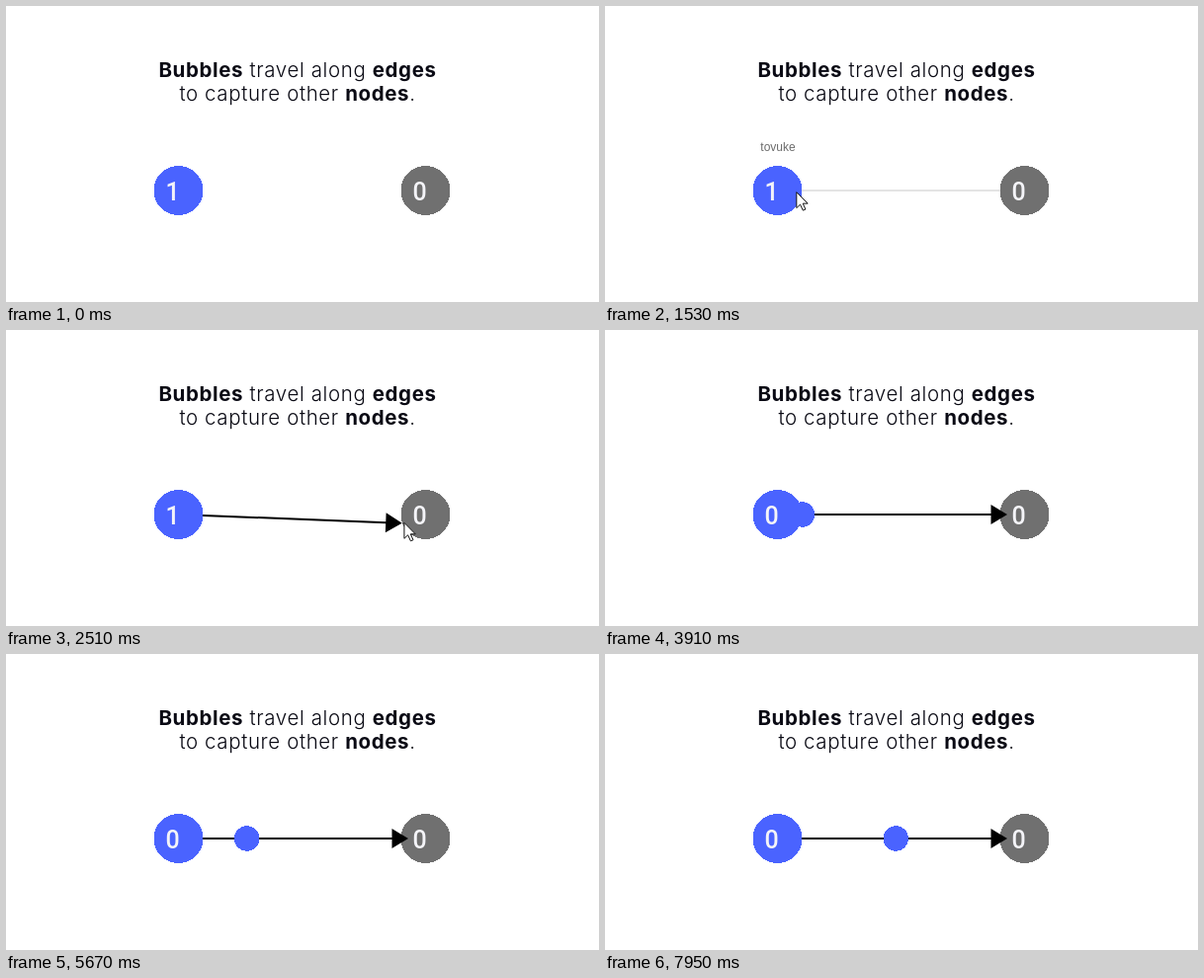
Recreate the animation shown at these times as an HTML page. Size 600 by 300 pixels, loop 8 s.

```html
<!DOCTYPE html>
<html lang="en">
<head>
<meta charset="utf-8">
<title>Bubbles and nodes</title>
<style>
  html, body { margin: 0; width: 100%; height: 100%; overflow: hidden; background: #fff; }
  svg { display: block; width: 600px; height: 300px; }
  circle { shape-rendering: crispEdges; }
  .intro { font: 300 20.5px Inter, sans-serif; letter-spacing: .03em; text-anchor: middle; fill: #0a0a14; }
  .strong { font-weight: 700; }
  .value { font: 500 25px Roboto, sans-serif; fill: #f4f4f8; }
  .label { font: 12px "Liberation Sans", sans-serif; fill: #6c6c6c; text-anchor: middle; }
</style>
</head>
<body>
<svg viewBox="0 0 600 300">
  <text class="intro" x="295" y="72"><tspan class="strong">Bubbles</tspan> travel along <tspan class="strong">edges</tspan></text>
  <text class="intro" x="295" y="96">to capture other <tspan class="strong">nodes</tspan>.</text>

  <path id="hint" d="M174.5 187H424.5" stroke="#e4e4e4" stroke-width="2"/>
  <path id="shaft" stroke="#000" stroke-width="2"/>
  <circle id="bubble" cy="187" r="12.7" fill="#4a63ff"/>
  <circle cx="174.5" cy="187" r="25" fill="#4a63ff"/>
  <circle cx="424.5" cy="187" r="25" fill="#707070"/>
  <path id="head" d="M0 0L-16.5 -10V10Z"/>
  <text id="count" class="value" x="161.5" y="197">1</text>
  <text class="value" x="411.5" y="197">0</text>

  <text id="ownerLabel" class="label" x="175" y="147">tovuke</text>
  <text id="emptyLabel" class="label" x="424" y="147">no one</text>
  <path id="cursor" d="M.5 .5V16.5L4.2 13L7 19L9.6 17.9L6.9 12H11.8Z" fill="#fff" stroke="#111"/>
</svg>

<script>
const LOOP = 8000, ENTER = 550, DRAG = 1560, CONNECT = 2610, LEAVE = 3270, LAUNCH = 3910;
const nodeA = { x: 174.5, y: 187 }, nodeB = { x: 424.5, y: 187 };
const HOVER_RADIUS = 21;

const entry = { x: 190, y: 300 };
const moves = [
  { start: ENTER, end: 1310, x: 166, y: 187 },
  { start: 1430, end: 2220, x: 386, y: 200 },
  { start: 2320, end: 2730, x: 423, y: 190 },
  { start: 2980, end: LEAVE, x: 386, y: 300 }
];

const [hint, shaft, head, bubble, count, ownerLabel, emptyLabel, cursor] =
  ["hint", "shaft", "head", "bubble", "count", "ownerLabel", "emptyLabel", "cursor"]
    .map(id => document.getElementById(id));

const show = (element, visible) => element.setAttribute("visibility", visible ? "visible" : "hidden");
const mix = (a, b, k) => a + (b - a) * k;

function cursorAt(t) {
  return moves.reduce((from, to) => {
    const k = Math.min(1, Math.max(0, (t - to.start) / (to.end - to.start)));
    return { x: mix(from.x, to.x, k), y: mix(from.y, to.y, k) };
  }, entry);
}

// A short burst out of the node, then a steady drift
function bubbleX(t) {
  const age = Math.max(0, t - LAUNCH);
  return 204.6 + 0.0222 * age - 5.1 * Math.exp(-age / 250);
}

function drawArrow(x, y) {
  const angle = Math.atan2(y - nodeA.y, x - nodeA.x);
  const endX = x - 10 * Math.cos(angle), endY = y - 10 * Math.sin(angle);
  shaft.setAttribute("d", `M${nodeA.x} ${nodeA.y}L${endX} ${endY}`);
  head.setAttribute("transform", `translate(${x} ${y}) rotate(${angle * 180 / Math.PI})`);
}

function draw(t) {
  const { x, y } = cursorAt(t);
  const near = node => Math.hypot(x - node.x, y - node.y) < HOVER_RADIUS;
  const hoverA = t < DRAG && near(nodeA);

  show(hint, hoverA);
  show(ownerLabel, hoverA);
  show(emptyLabel, t >= CONNECT && near(nodeB));

  show(cursor, t >= ENTER && t < LEAVE);
  cursor.setAttribute("transform", `translate(${x - 0.8} ${y - 0.5})`);

  show(shaft, t >= DRAG);
  show(head, t >= DRAG);
  if (t >= CONNECT) drawArrow(407, 187);
  else drawArrow(x - 2.5, y + 0.5);

  show(bubble, t >= LAUNCH);
  bubble.setAttribute("cx", bubbleX(t));
  count.textContent = t < LAUNCH ? "1" : "0";
}

const start = performance.now();
function frame() {
  draw((performance.now() - start) % LOOP);
  requestAnimationFrame(frame);
}
frame();
</script>
</body>
</html>
```
